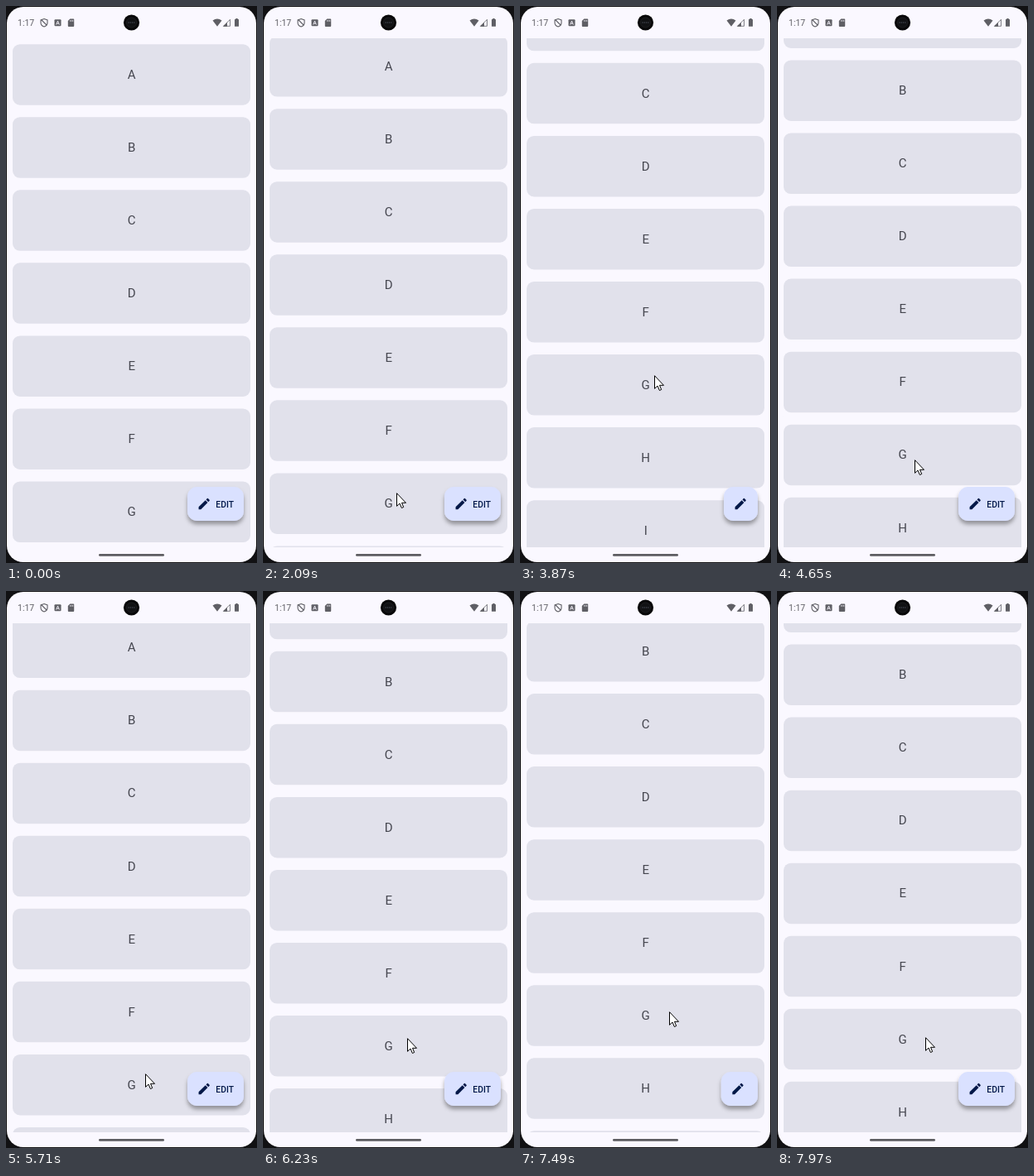
Animation of 303 by 673 pixels, one loop 8000 ms. Source, as an HTML page:

```html
<!DOCTYPE html>
<html lang="en">
<head>
<meta charset="utf-8">
<title>Scrolling list with collapsing button</title>
<style>
  html, body { margin: 0; width: 100%; height: 100%; overflow: hidden; background: #111113; }
  svg { display: block; width: 303px; height: 673px; }
  text { font-family: Roboto, sans-serif; }
</style>
</head>
<body>
<svg viewBox="0 0 303 673" xmlns="http://www.w3.org/2000/svg">
  <defs>
    <clipPath id="view"><rect x="0" y="39" width="303" height="615"/></clipPath>
    <filter id="shade" x="-30%" y="-30%" width="160%" height="180%">
      <feDropShadow dx="0" dy="4.2" stdDeviation="2.7" flood-color="#000" flood-opacity=".35"/>
    </filter>
  </defs>
  <rect width="303" height="673" fill="#111113"/>
  <rect x="1" y="1" width="301" height="671" rx="20" fill="#faf8ff"/>

  <g clip-path="url(#view)"><g id="list"></g></g>

  <!-- status bar -->
  <g fill="#5f5f65">
    <text x="14" y="24" font-size="10.5">1:17</text>
    <path d="M46 15.6 50 17V20.2C50 22.6 48.3 24.2 46 25 43.7 24.2 42 22.6 42 20.2V17ZM42.5 16.5 49.5 23.5" fill="none" stroke="#5f5f65" stroke-width="1.1"/>
    <rect x="58.5" y="16.3" width="8" height="8" rx="1"/>
    <path d="M60.6 22.6 62.5 18 64.4 22.6M61.3 21.2H63.7" fill="none" stroke="#faf8ff" stroke-width=".9"/>
    <path d="M77.3 15.5H81.3Q82.2 15.5 82.2 16.4V24.1Q82.2 25 81.3 25H75.7Q74.8 25 74.8 24.1V18Z"/>
    <path d="M77.6 17V18.8M79.2 17V18.8M80.8 17V18.8" stroke="#faf8ff" stroke-width=".7"/>
    <path d="M249.5 17.6Q255 13.2 260.5 17.6L255 24.7Z"/>
    <path d="M262.5 24.3 270.5 16.3V24.3Z" fill="none" stroke="#5f5f65" stroke-width=".8"/>
    <path d="M262 24.7 267 19.7V24.7Z"/>
    <path d="M277.3 15H279.7V16H280.4Q281 16 281 16.6V24.2Q281 24.8 280.4 24.8H276.6Q276 24.8 276 24.2V16.6Q276 16 276.6 16H277.3Z"/>
  </g>
  <circle cx="151.5" cy="20" r="9.6" fill="#080809"/>
  <circle cx="151.5" cy="20" r="6" fill="#111214" stroke="#1d1e21"/>
  <path d="M147.5 20H155.5" stroke="#34373e" stroke-width="2" stroke-dasharray="1.2 1"/>
  <rect x="112" y="662" width="79" height="2.8" rx="1.4" fill="#5d5d61"/>

  <!-- floating button -->
  <rect id="fab" y="581" height="41" rx="11.7" fill="#dae1ff" filter="url(#shade)"/>
  <g id="pen"><path transform="scale(.737) translate(-12 -12)" fill="#001848"
    d="M3 17.25V21H6.75L17.81 9.94 14.06 6.19ZM20.71 7.04A1 1 0 0 0 20.71 5.63L18.37 3.29A1 1 0 0 0 16.96 3.29L15.13 5.12 18.88 8.87Z"/></g>
  <text id="label" y="605.7" font-size="10.3" font-weight="500" letter-spacing=".07" fill="#001848">EDIT</text>

  <path id="cursor" d="M.5 .7V16.3L4 13 6.4 18.5 8.7 17.5 6.5 12.3H11.5Z" fill="#fff" stroke="#000" stroke-linejoin="round"/>
</svg>

<script>
const LOOP = 8000, TICK = 120, PITCH = 88.05, RIGHT = 287;
const [list, fab, pen, label, cursor] =
  ['list', 'fab', 'pen', 'label', 'cursor'].map(id => document.getElementById(id));

list.innerHTML = [...'ABCDEFGHIJ'].map((letter, i) => {
  const y = 46.2 + i * PITCH;
  return `<rect x="8" y="${y}" width="287" height="73.5" rx="8.8" fill="#e1e1eb"/>
    <text x="151.7" y="${y + 41.8}" font-size="15" text-anchor="middle" fill="#45464f">${letter}</text>`;
}).join('');

// Turning points of the drags
const key = (time, x, y, scroll) => ({ time, x, y, scroll });
const keys = [
  key(0, 231, 631, 0), key(1150, 231, 631, 0),
  key(1420, 161, 612, 0), key(1820, 161, 607, 0),
  key(2090, 161, 588, 10.1), key(2870, 161, 507, 87.3), key(3350, 162, 434, 159),
  key(3750, 162, 434, 159), key(4140, 163, 473, 141), key(4650, 166, 548, 68.8), key(5280, 167, 611, 0),
  key(5590, 167, 611, 0), key(5710, 168, 583, 14.6), key(6710, 180, 493, 112.2),
  key(7250, 181, 493, 112.5), key(7970, 179, 539, 69.7)
];

// The picture refreshes in ticks, counted from the latest turning point
function pose(t) {
  const i = keys.findLastIndex(k => k.time <= t);
  const a = keys[i], b = keys[i + 1] || a;
  const p = Math.floor((t - a.time) / TICK) * TICK / (b.time - a.time || 1);
  const mix = name => a[name] + (b[name] - a[name]) * p;
  return { x: mix('x'), y: mix('y'), scroll: mix('scroll') };
}

// The button shrinks once the first row has scrolled away
function openness(scroll) {
  const p = Math.min(1, Math.max(0, (scroll - PITCH) / 20));
  return (1 - p) ** 3;
}

function draw(now) {
  const t = now % LOOP, { x, y, scroll } = pose(t);
  list.setAttribute('transform', `translate(0 ${-scroll})`);
  cursor.setAttribute('transform', `translate(${Math.round(x)} ${Math.round(y)})`);
  cursor.setAttribute('visibility', t < keys[1].time ? 'hidden' : 'visible');

  const open = openness(scroll), width = 41 + 27 * open, left = RIGHT - width;
  fab.setAttribute('x', left);
  fab.setAttribute('width', width);
  pen.setAttribute('transform', `translate(${left + 20.2} 601.5)`);
  label.setAttribute('x', left + 34.3);
  label.setAttribute('opacity', Math.max(0, open * 2 - 1));
}

const begin = performance.now();
function loop() {
  draw(performance.now() - begin);
  requestAnimationFrame(loop);
}
loop();
</script>
</body>
</html>
```
